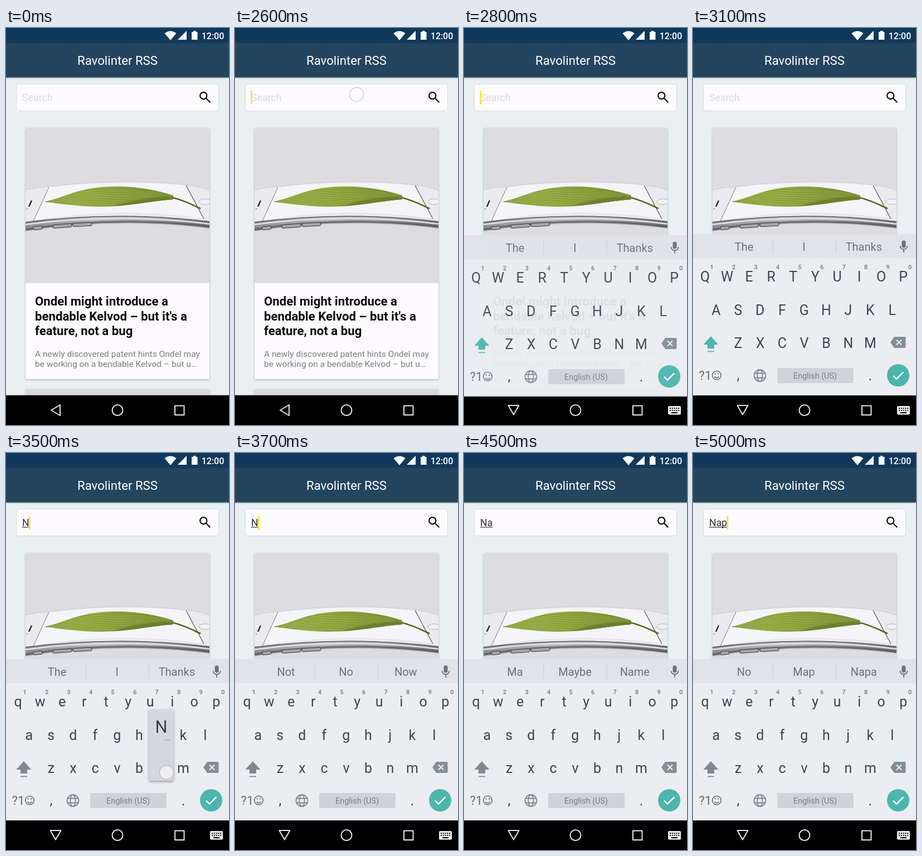
Animation of 400x711 px, one loop 5.1 s. Source, as an HTML page:

```html
<!DOCTYPE html>
<html lang="en">
<head>
<meta charset="utf-8">
<title>News reader search</title>
<style>
html, body { margin: 0; width: 100%; height: 100%; overflow: hidden; background: #e9f0f1; }
svg { display: block; width: 100%; height: 100%; font-family: Roboto, "Noto Sans", sans-serif; }
text { white-space: pre; }
.card { filter: drop-shadow(0 1px 1.5px rgba(0, 0, 0, .3)); }
.bar { filter: drop-shadow(0 1px 1px rgba(0, 0, 0, .35)); }
.pop { filter: drop-shadow(0 2px 2px rgba(0, 0, 0, .35)); }
.soft { filter: blur(1.3px); }
</style>
</head>
<body>
<svg id="stage" viewBox="0 0 400 711">
  <defs>
    <clipPath id="photoClip"><path d="M35 457V182a3 3 0 0 1 3-3H362a3 3 0 0 1 3 3V457z"/></clipPath>
    <clipPath id="leafClip"><path id="leafShape" d="M70 311C100 305 125 289 170 285C215 281 262 287 300 300V307C265 309 235 317 190 319.500C150 321.500 110 317 70 311z"/></clipPath>
    <linearGradient id="leafFill" x1="0" y1="0" x2="1" y2="0">
      <stop offset="0" stop-color="#a5b84c"/><stop offset=".45" stop-color="#93ab3c"/><stop offset="1" stop-color="#738c2d"/>
    </linearGradient>
    <linearGradient id="metal" x1="0" y1="0" x2="1" y2="0">
      <stop offset="0" stop-color="#8d8e91"/><stop offset=".4" stop-color="#c0c1c4"/>
      <stop offset=".65" stop-color="#b5b6b9"/><stop offset="1" stop-color="#707175"/>
    </linearGradient>
    <linearGradient id="status" x1="0" y1="0" x2="0" y2="1">
      <stop offset="0" stop-color="#0d385c"/><stop offset="1" stop-color="#123a5c"/>
    </linearGradient>
  </defs>

  <rect width="400" height="711" fill="#e9f0f1"/>

  <rect class="bar" width="400" height="88.500" fill="#24455e"/>
  <rect width="400" height="27" fill="url(#status)"/>
  <g fill="#fff">
    <path d="M284.5 9.5Q295 1.5 305.5 9.5L295 22z"/>
    <path d="M324 5V21H308z"/>
    <path d="M333 7h3V5h4.500v2h3v14h-10.500z"/>
    <text x="371" y="19.500" font-size="16" font-weight="500" text-anchor="middle">12:00</text>
    <text x="200" y="66" font-size="22.200" text-anchor="middle">Ravolinter RSS</text>
  </g>

  <rect x="18.500" y="100.500" width="363" height="48" rx="4" fill="#fdfbfe" stroke="#d3d9da"/>
  <g font-size="17.780">
    <text id="hint" x="29" y="131" fill="#d9d9dc">Search</text>
    <text id="typed" x="29" y="131" fill="#303234"></text>
  </g>
  <rect id="under" x="29" y="132.300" height="1.200" fill="#303234"/>
  <rect id="caret" y="112.500" width="2.700" height="24.500" fill="#f4e73c"/>
  <g fill="none" stroke="#0b0b0b" stroke-width="2.200">
    <circle cx="354.200" cy="121.200" r="6.100"/><path d="M358.500 125.500L366.300 133.300"/>
  </g>

  <rect class="card" x="35" y="179" width="330" height="450" rx="3" fill="#fdfbfe"/>
  <g id="photo" clip-path="url(#photoClip)"></g>
  <g font-size="22.200" font-weight="700" fill="#0c0c0d">
    <text x="52" y="497">Ondel might introduce a</text>
    <text x="52" y="523.500">bendable Kelvod – but it's a</text>
    <text x="52" y="549.500">feature, not a bug</text>
  </g>
  <g font-size="15.550" fill="#7e7e80">
    <text x="52" y="589">A newly discovered patent hints Ondel may</text>
    <text x="52" y="606.500">be working on a bendable Kelvod – but u…</text>
  </g>
  <rect class="card" x="35" y="647" width="330" height="40" rx="3" fill="#dad8da"/>

  <rect y="657.700" width="400" height="54" fill="#000"/>
  <g id="board"></g>
  <g id="popup">
    <rect class="pop" x="-22" width="44" height="128" rx="3" fill="#d6d7dd"/>
    <text id="popChar" y="42" font-size="31" text-anchor="middle" fill="#37444b"></text>
    <g fill="#8e959a"><rect x="6" y="54" width="2" height="2"/><rect x="9.500" y="54" width="2" height="2"/><rect x="13" y="54" width="2" height="2"/></g>
  </g>

  <g fill="none" stroke="#e6e6e6" stroke-width="2" stroke-linejoin="round">
    <path id="back" d="M81 684.500L97 675V694z"/>
    <path id="down" d="M79.500 676H98.500L89 692.500z"/>
    <circle cx="200" cy="684.500" r="9.500"/>
    <rect x="303" y="676.500" width="16.500" height="16.500"/>
  </g>
  <g id="switcher"></g>

  <circle id="touch" r="12.500" stroke="#b9b9bd" stroke-width="1.300"/>
</svg>

<script>
const $ = id => document.getElementById(id);
const LOOP = 5100;
const PITCH = 39.5;
const ROWS = [
  { keys: 'qwertyuiop', x: 21.700, base: 454 },
  { keys: 'asdfghjkl', x: 41.300, base: 513.500 },
  { keys: 'zxcvbnm', x: 81, base: 572.500 }
];
const WORDS = [
  ['The', 'I', 'Thanks'], ['Not', 'No', 'Now'],
  ['Ma', 'Maybe', 'Name'], ['No', 'Map', 'Napa']
];
const INK = '#3b474d', GREY = '#7f888d', TEAL = '#4db6ac', BOARD = '#ebedf1';

const tag = (name, attrs, body = '') =>
  `<${name} ${Object.entries(attrs).map(([k, v]) => `${k}="${v}"`).join(' ')}>${body}</${name}>`;
const box = (x, y, width, height, fill, rx = 0) => tag('rect', { x, y, width, height, fill, rx });
const fillPath = (d, fill, more) => tag('path', { d, fill, ...more });
const line = (d, stroke, width = 1, more) =>
  tag('path', { d, stroke, fill: 'none', 'stroke-width': width, ...more });
const label = (x, y, size, fill, body, more) =>
  tag('text', { x, y, 'font-size': size, fill, 'text-anchor': 'middle', ...more }, body);

function drawLeaf() {
  let veins = '';
  for (let i = -9; i <= 9; i++) {
    const y = 303 + i * 2.1;
    veins += line(`M70 311C120 ${y + 3} 210 ${y - 4} 302 ${303 + i * .4}`,
      i % 2 ? '#5f7726' : '#bccb70', i ? .8 : 1.2, { opacity: i % 2 ? .75 : .6 });
  }
  const shade = fillPath('M190 320Q240 302 303 301V310z', '#5a7122', { opacity: .6, class: 'soft' });
  return line('M296 303Q318 308 348 323', '#59661f', 2.8, { 'stroke-linecap': 'round' }) +
    '<use href="#leafShape" fill="url(#leafFill)"/>' +
    tag('g', { 'clip-path': 'url(#leafClip)' }, veins + shade);
}

function drawPhoto() {
  const pill = (cx, cy, w, a) => tag('rect', {
    x: cx - w / 2, y: cy - 3, width: w, height: 6, rx: 3, fill: '#a5a6a9', stroke: '#3c3d40',
    transform: `rotate(${a} ${cx} ${cy})`
  });
  const backEdge = 'M35 290Q55 285 78 284Q205 268 324 281Q346 284 365 290';
  return box(35, 179, 330, 278, '#dddcde') +
    fillPath(backEdge + 'V350Q200 324 35 350z', '#ebebed') +
    line(backEdge, '#c5c5c8', .8) +
    fillPath('M77 285Q205 271 323 282L355 342Q200 320 49 346z', '#f5f4f7') +
    line('M77 285L49 346', '#6c6d74', .9) + line('M323 282L355 342', '#50515b', 1.2) +
    line('M49 346Q200 320 355 342', '#d8d8dc', .8) +
    fillPath('M35 347Q200 326 365 346V358Q200 336 35 363z', 'url(#metal)') +
    line('M35 348Q200 327 365 347', '#5f6064', 1.3) +
    line('M35 352Q200 330 365 351', '#e2e2e4', 2.4) +
    line('M35 361Q200 336 365 356', '#5b5c60', 3.5, { class: 'soft' }) +
    pill(57, 358, 16, -5) + pill(101, 354.5, 34, -4) + pill(137, 352, 34, -3) +
    line('M41 320L46 309', '#26272b', 2.4) + tag('circle', { cx: 38, cy: 324, r: 1, fill: '#77787c' }) +
    tag('ellipse', { cx: 357, cy: 311, rx: 11, ry: 5, fill: '#f1f1f3', stroke: '#b3b3b7' }) +
    drawLeaf();
}

function drawBoard() {
  let out = box(0, 369, 400, 289, BOARD) + box(0, 369, 400, 43.5, '#e1e3e8') +
    box(142.5, 379, 1, 25, '#c9ccd1') + box(255.5, 379, 1, 25, '#c9ccd1');
  [91.5, 199, 306.3].forEach(x => out += label(x, 399, 20, '#6a7378', '', { class: 'word' }));
  out += box(374.5, 380.5, 7, 13, '#697277', 3.5) +
    line('M371.500 390a6.500 6.500 0 0 0 13 0M378 396.500V402', '#697277', 1.8);

  ROWS.forEach(({ keys, x, base }, r) => [...keys].forEach((k, i) => {
    const cx = x + i * PITCH;
    out += label(cx, base, 25, INK, k, { class: 'key' });
    if (!r) out += label(cx + 12, 432, 11, GREY, (i + 1) % 10, { 'font-weight': 700 });
  }));

  out += tag('g', { id: 'shift' }, fillPath('M32 552L45.500 567H38V574H26V567H18.500z') + '<path d="M26 578.500h12v1.800h-12z"/>');
  out += fillPath('M354 563L361 553H379.500Q381.500 553 381.500 555V571Q381.500 573 379.500 573H361z', '#858e93') +
    line('M365 558.500l9 9m0-9l-9 9', BOARD, 2.2);

  out += label(22, 630, 22, '#626c71', '?1');
  out += tag('circle', { cx: 42.5, cy: 622, r: 7.8, fill: 'none', stroke: '#626c71', 'stroke-width': 1.6 }) +
    line('M38.500 624.500q4 4.500 8 0', '#626c71', 1.5) +
    box(38.7, 618.2, 2.2, 2.4, '#626c71', 1) + box(44.1, 618.2, 2.2, 2.4, '#626c71', 1);
  out += label(81, 630, 25, INK, ',') + label(318, 630.5, 25, INK, '.');
  out += tag('g', { fill: 'none', stroke: GREY, 'stroke-width': 1.8 },
    '<circle cx="120" cy="622.500" r="10.500"/><ellipse cx="120" cy="622.500" rx="4.600" ry="10.500"/>' +
    '<path d="M110.500 618.500h19M110.500 626.500h19"/>');
  out += box(151, 609, 137, 27, '#d0d2d7', 2.5) + label(219, 628, 14.4, '#757d82', 'English (US)');
  return out + tag('circle', { cx: 368, cy: 622, r: 20, fill: TEAL }) +
    line('M359 622.500l6 6L377.500 616', '#fff', 2.3);
}

function drawSwitcher() {
  let out = box(366, 677, 23, 15.5, '#ededed', 2);
  for (let i = 0; i < 10; i++) out += box(369 + i % 5 * 3.8, i < 5 ? 680 : 683.8, 2, 2, '#000');
  return out + box(372, 688, 11, 2, '#000');
}

$('photo').innerHTML = drawPhoto();
$('board').innerHTML = drawBoard();
$('switcher').innerHTML = drawSwitcher();
const words = document.querySelectorAll('.word');
const keys = document.querySelectorAll('.key');
const letters = ROWS.map(r => r.keys).join('');

// Each step changes only the listed parts of the state.
const STEPS = [
  [0, { text: '', caret: 0, show: 0, dy: 0, caps: 1, words: 0, pop: '', at: [218, 119], ring: 0, solid: 0 }],
  [2600, { caret: 1, ring: .75 }],
  [2700, { ring: .35, show: .55, dy: 16 }],
  [2800, { ring: 0, show: .94, dy: 2 }],
  [2900, { show: 1, dy: 0 }],
  [3100, { caret: 0 }],
  [3500, { text: 'N', caret: 1, caps: 0, pop: 'N', at: [288, 572], ring: 1, solid: .75 }],
  [3600, { pop: '', words: 1, ring: .4, solid: 0 }],
  [3700, { ring: 0 }],
  [4000, { text: 'Na', pop: 'a', at: [39.5, 505], ring: 1, solid: .75 }],
  [4100, { pop: '', words: 2, ring: .4, solid: 0 }],
  [4200, { ring: 0 }],
  [4500, { caret: 0 }],
  [4700, { pop: 'p', at: [379, 447], ring: 1, solid: .75 }],
  [4800, { text: 'Nap', caret: 1 }],
  [4900, { pop: '', words: 3, ring: .4, solid: 0 }],
  [5000, { ring: 0 }]
];

const stateAt = t => Object.assign({}, ...STEPS.filter(s => s[0] <= t).map(s => s[1]));
const setShown = (id, on) => $(id).setAttribute('visibility', on ? 'visible' : 'hidden');

function placePopup(char) {
  setShown('popup', char);
  if (!char) return;
  const low = char.toLowerCase();
  const row = ROWS.find(r => r.keys.includes(low));
  const x = row.x + row.keys.indexOf(low) * PITCH;
  $('popup').setAttribute('transform', `translate(${x} ${row.base - 113.5})`);
  $('popChar').textContent = char;
}

function render(s) {
  $('typed').textContent = s.text;
  const width = s.text ? $('typed').getComputedTextLength() : 0;
  $('under').setAttribute('width', width);
  $('caret').setAttribute('x', 28.3 + width);
  setShown('caret', s.caret);
  setShown('hint', !s.text);

  $('board').setAttribute('opacity', s.show);
  $('board').setAttribute('transform', `translate(0 ${s.dy})`);
  $('shift').setAttribute('fill', s.caps ? TEAL : GREY);
  keys.forEach((k, i) => k.textContent = s.caps ? letters[i].toUpperCase() : letters[i]);
  words.forEach((w, i) => w.textContent = WORDS[s.words][i]);
  placePopup(s.pop);

  setShown('back', !s.show);
  setShown('down', s.show);
  setShown('switcher', s.show);

  const touch = $('touch');
  touch.setAttribute('cx', s.at[0]);
  touch.setAttribute('cy', s.at[1]);
  touch.setAttribute('opacity', s.ring);
  touch.setAttribute('fill', `rgba(246,246,249,${s.solid})`);
}

const start = performance.now();
let last = -1;
function frame() {
  const t = (performance.now() - start) % LOOP;
  const step = STEPS.filter(s => s[0] <= t).length;
  if (step !== last) render(stateAt(t));
  last = step;
  requestAnimationFrame(frame);
}
frame();
</script>
</body>
</html>
```
